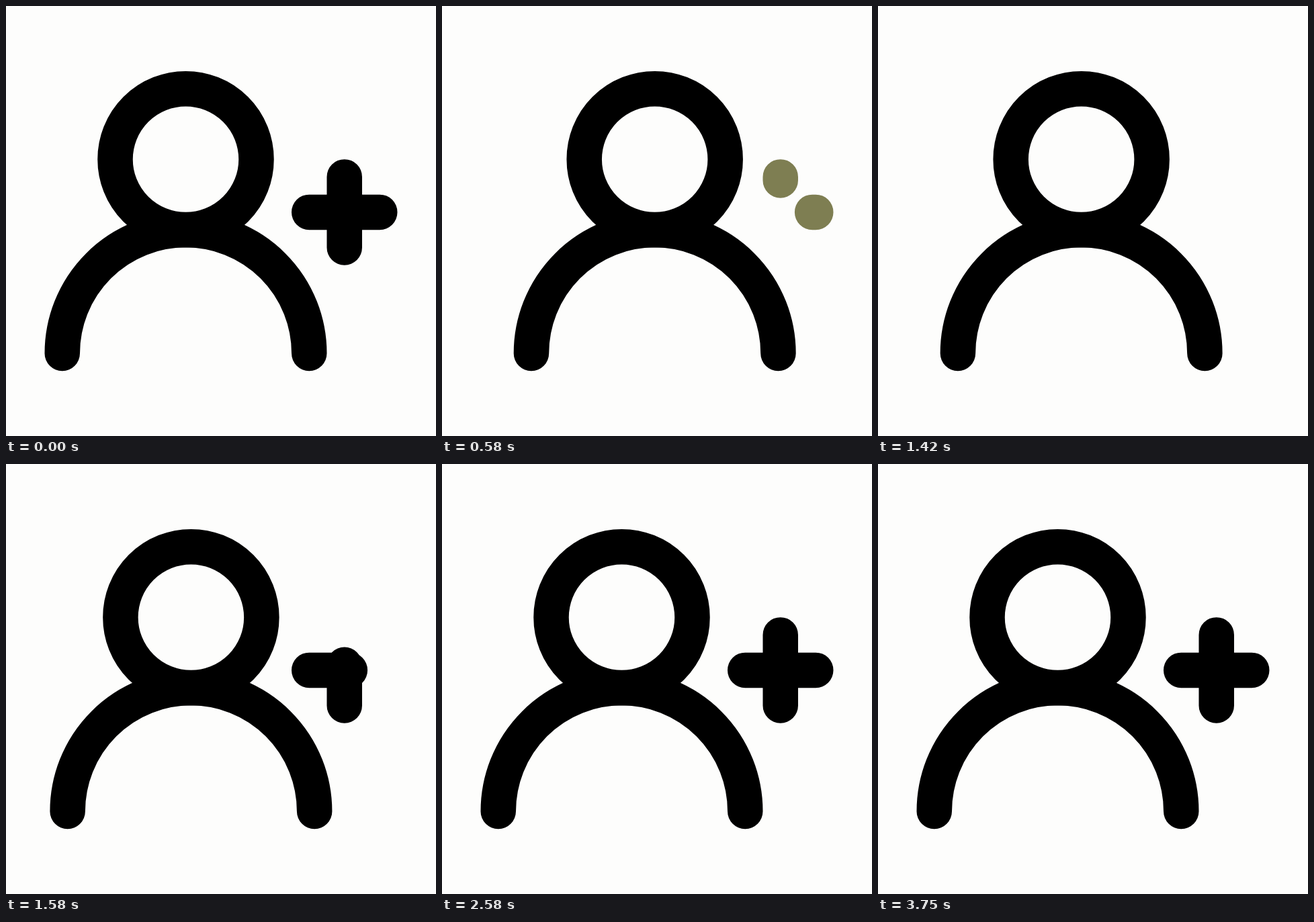
Write an HTML page with a canvas that moves like this. It is 640x640 px and loops after 3830 ms.

```html
<!DOCTYPE html>
<html lang="en">
<head>
<meta charset="utf-8">
<title>Add user icon</title>
<style>
  html, body { margin: 0; width: 100%; height: 100%; overflow: hidden; background: #fdfdfc; }
  canvas { display: block; width: 640px; height: 640px; }
</style>
</head>
<body>
<canvas id="stage" width="640" height="640"></canvas>
<script>
const ctx = document.getElementById('stage').getContext('2d');
const LOOP = 3830;
const STEP = 1000 / 12;
const UNIT = 26.25;
const PLUS = { x: 320 + 7 * UNIT, y: 320 - UNIT / 2, arm: 2 * UNIT };

// cubic-bezier(.25, .1, .25, 1), solved by bisection
function ease(p) {
  if (p <= 0) return 0;
  if (p >= 1) return 1;
  let lo = 0, hi = 1;
  for (let i = 0; i < 24; i++) {
    const s = (lo + hi) / 2;
    if (0.75 * s * (1 - s) + s ** 3 < p) lo = s; else hi = s;
  }
  const s = lo, r = 1 - s;
  return 0.3 * s * r * r + 3 * s * s * r + s ** 3;
}

const tween = (t, start, duration) => ease((t - start) / duration);

function stroke(color, trace) {
  ctx.strokeStyle = color;
  ctx.beginPath();
  trace();
  ctx.stroke();
}

function drawPerson(shift) {
  const x = 320 - 2 * UNIT + shift;
  stroke('#000', () => ctx.arc(x, 320 - 3.5 * UNIT, 4 * UNIT, 0, 2 * Math.PI));
  stroke('#000', () => ctx.arc(x, 320 + 7.5 * UNIT, 7 * UNIT, Math.PI, 2 * Math.PI));
}

// from and to are fractions of each arm: left to right and bottom to top
function drawPlus(from, to, opacity) {
  if (opacity <= 0) return;
  const fade = 1 - opacity;
  const level = Math.round(253 * fade);
  const blue = Math.round(252 * fade ** 1.6);
  const a = (2 * from - 1) * PLUS.arm;
  const b = Math.max((2 * to - 1) * PLUS.arm, a + 0.01);
  stroke(`rgb(${level}, ${level}, ${blue})`, () => {
    ctx.moveTo(PLUS.x + a, PLUS.y);
    ctx.lineTo(PLUS.x + b, PLUS.y);
    ctx.moveTo(PLUS.x, PLUS.y - a);
    ctx.lineTo(PLUS.x, PLUS.y - b);
  });
}

function render(t) {
  ctx.fillStyle = '#fdfdfc';
  ctx.fillRect(0, 0, 640, 640);
  ctx.lineWidth = 2 * UNIT;
  ctx.lineCap = 'round';

  drawPerson(2 * UNIT * (tween(t, 30, 800) - tween(t, 1310, 495)));

  if (t < 1300) drawPlus(tween(t, 32, 760), 1, 1 - tween(t, 525, 200));
  else drawPlus(0, tween(t, 1418, 495), tween(t, 1418, 80));
}

function tick() {
  const t = performance.now() % LOOP;
  render(Math.min(45, Math.floor((t + 6.7) / STEP)) * STEP);
  requestAnimationFrame(tick);
}
tick();
</script>
</body>
</html>
```
